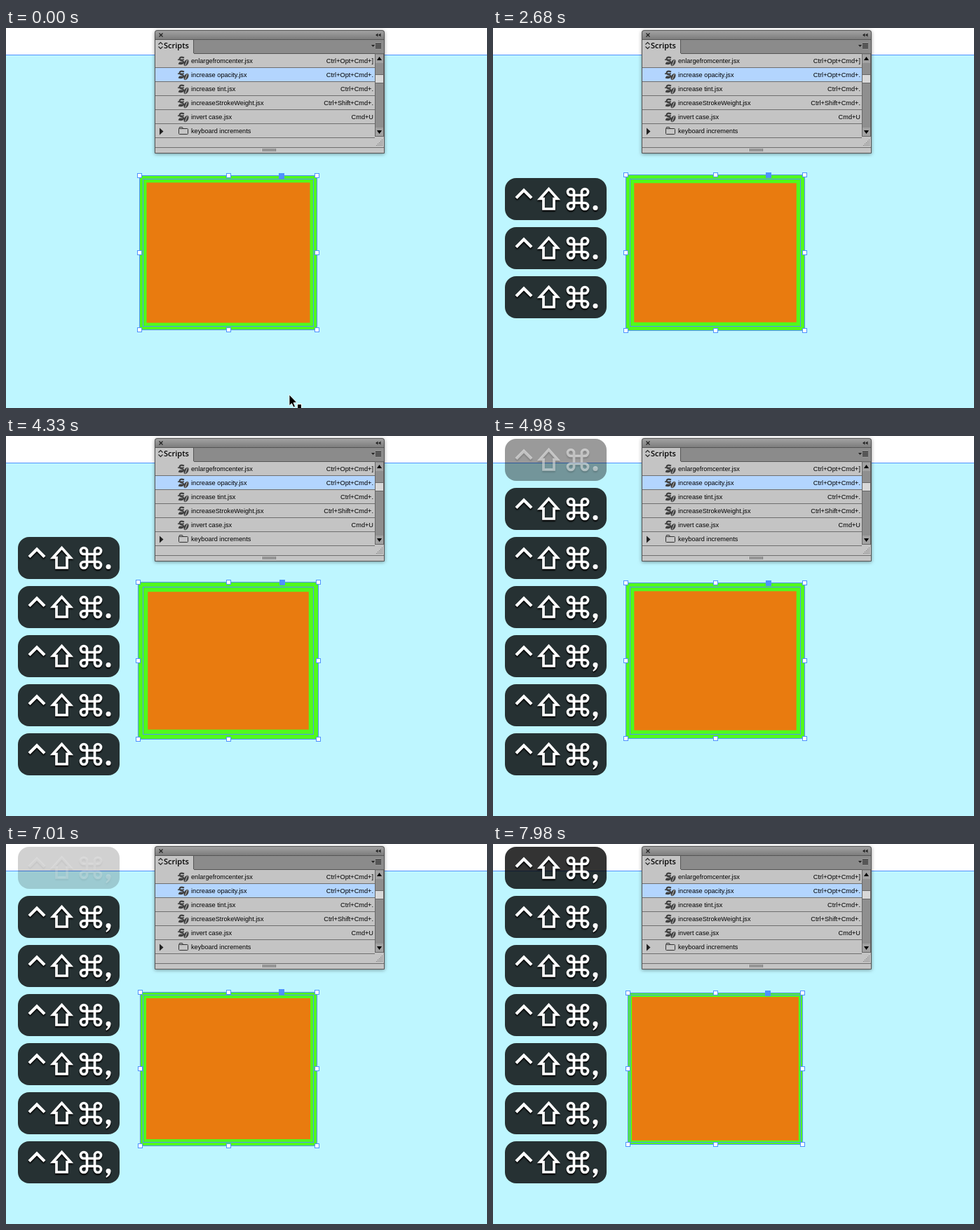
Animation of 686 by 542 pixels, one loop 8 s. Source, as an HTML page with a canvas:

```html
<!DOCTYPE html>
<html lang="en">
<head>
<meta charset="utf-8">
<title>Stroke weight shortcuts</title>
<style>
html, body { margin: 0; width: 100%; height: 100%; overflow: hidden; background: #fff; }
canvas { display: block; }
</style>
</head>
<body>
<canvas id="stage" width="686" height="542"></canvas>
<script>
const ctx = document.getElementById('stage').getContext('2d');
const LOOP = 8000, HOLD = 1910, GONE = 2170, LAG = 70;
const BLUE = '#4f91ff', CYAN = '#bef6ff', GREY = '#c4c4c4', LINE = '#6e6e6e', INK = '#404040';

// Evenly spaced presses; lag is the wait before a new bezel fills the bottom slot
const run = (char, start, gap, count, lag = LAG) =>
  Array.from({ length: count }, (_, i) => ({ char, lag, t: start + gap * i }));
const presses = [
  ...run('.', 2000, 0, 1),
  ...run('.', 2160, 260, 6),
  ...run(',', 4420, 160, 4),
  ...run(',', 5120, 120, 6, 0),
  ...run(',', 7100, 30, 4),
  ...run(',', 7360, 180, 4)
];

// A full stop thickens the stroke, a comma thins it
const weightAt = now => presses.reduce(
  (w, p) => p.t + LAG > now ? w : w + (p.char === '.' ? 0.5 : -0.46), 10);

function fill(color, x, y, w, h) {
  ctx.fillStyle = color;
  ctx.fillRect(x, y, w, h);
}

function trace(points) {
  ctx.beginPath();
  points.forEach(([x, y]) => ctx.lineTo(x, y));
}

function poly(points, color) {
  trace(points);
  ctx.closePath();
  ctx.fillStyle = color;
  ctx.fill();
}

function frame(color, x, y, w, h) {
  ctx.strokeStyle = color;
  ctx.lineWidth = 1;
  ctx.strokeRect(x + 0.5, y + 0.5, w, h);
}

// Small triangle pointing up (s = 1) or down (s = -1)
const wedge = (x, y, r, s) =>
  poly([[x - r, y + s * 2.5], [x, y - s * 2.5], [x + r, y + s * 2.5]], '#000');

function text(str, x, y, font, align = 'left') {
  ctx.font = font;
  ctx.textAlign = align;
  ctx.fillStyle = '#000';
  ctx.fillText(str, x, y);
}

function scriptIcon(x, y) {
  ctx.strokeStyle = INK;
  ctx.lineWidth = 2.2;
  ctx.beginPath();
  ctx.moveTo(x + 9, y + 2);
  ctx.bezierCurveTo(x + 2, y - 1, x + 1, y + 5, x + 5, y + 6);
  ctx.bezierCurveTo(x + 11, y + 7, x + 8, y + 12, x + 1, y + 10);
  ctx.stroke();
  fill(INK, x, y + 4, 9, 1.5);
  fill(INK, x + 2, y + 8, 6, 1.5);
  ctx.beginPath();
  ctx.ellipse(x + 12, y + 9, 3, 5, 0.5, 0, 7);
  ctx.fill();
  trace([[x + 13.5, y + 5], [x + 10.5, y + 13]]);
  ctx.strokeStyle = GREY;
  ctx.lineWidth = 1;
  ctx.stroke();
}

function folderIcon(x, y) {
  ctx.beginPath();
  ctx.roundRect(x, y + 2, 13, 8, 1);
  ctx.moveTo(x, y + 3);
  ctx.lineTo(x + 1, y);
  ctx.lineTo(x + 5, y);
  ctx.lineTo(x + 6, y + 2);
  ctx.strokeStyle = '#333';
  ctx.lineWidth = 1;
  ctx.stroke();
}

const rows = [
  ['enlargefromcenter.jsx', 'Ctrl+Opt+Cmd+]'],
  ['increase opacity.jsx', 'Ctrl+Opt+Cmd+.'],
  ['increase tint.jsx', 'Ctrl+Cmd+.'],
  ['increaseStrokeWeight.jsx', 'Ctrl+Shift+Cmd+.'],
  ['invert case.jsx', 'Cmd+U'],
  ['keyboard increments', '']
];

function drawHeader() {
  const bar = ctx.createLinearGradient(0, 4, 0, 16);
  bar.addColorStop(0, '#a2a2a2');
  bar.addColorStop(1, '#7d7d7d');
  ctx.beginPath();
  ctx.roundRect(213, 4, 326, 12, [3, 3, 0, 0]);
  ctx.fillStyle = bar;
  ctx.fill();
  ctx.strokeStyle = '#222';
  ctx.lineWidth = 1.2;
  for (const s of [-2.5, 2.5]) {
    trace([[221 - s, 7.5], [221 + s, 12.5]]);
    ctx.stroke();
  }
  for (const x of [527, 531]) poly([[x, 10], [x + 3.5, 7.5], [x + 3.5, 12.5]], '#222');

  fill('#8b8b8b', 213, 17, 326, 19);
  fill(GREY, 213, 17, 54, 20);
  fill('#555', 267, 17, 1, 19);
  fill('#555', 268, 36, 271, 1);
  ctx.lineWidth = 1.1;
  for (const s of [-1, 1]) {
    trace([[217.5, 25 + s * 1.5], [220.5, 25 + s * 4.5], [223.5, 25 + s * 1.5]]);
    ctx.stroke();
  }
  text('Scripts', 225, 28.8, '600 11px "Open Sans", sans-serif');
  poly([[521, 24], [526, 24], [523.5, 27]], '#222');
  for (let y = 22; y < 30; y += 2) fill('#222', 527, y, 8, 1);
}

function drawScrollbar() {
  fill('#8f8f8f', 527, 37, 11, 117);
  frame('#666', 526, 36, 12, 118);
  fill('#a2a2a2', 527, 38, 11, 12);
  fill('#a2a2a2', 527, 142, 11, 12);
  wedge(532.5, 43.5, 3.5, 1);
  wedge(532.5, 148.5, 3.5, -1);
  fill('#d8d8d8', 527, 67, 11, 11);
  frame('#666', 526, 66, 12, 12);
}

function drawPanel() {
  ctx.save();
  ctx.shadowColor = 'rgba(0,0,0,.4)';
  ctx.shadowBlur = 5;
  ctx.shadowOffsetY = 1;
  ctx.beginPath();
  ctx.roundRect(212, 3, 328, 176, [4, 4, 1, 1]);
  ctx.fillStyle = '#555';
  ctx.fill();
  ctx.restore();

  fill(GREY, 213, 36, 326, 142);
  drawHeader();
  const font = '9.2px "Liberation Sans", Arial, sans-serif';
  rows.forEach(([name, keys], i) => {
    const y = 37 + 20 * i;
    if (i === 1) fill('#b3d5fe', 213, y, 313, 19);
    fill(LINE, 213, y + 19, 313, 1);
    text(name, 264, y + 13, font);
    text(keys, 524, y + 13, font, 'right');
    if (keys) scriptIcon(245, y + 3.5);
  });
  poly([[219, 142.5], [224.5, 147.5], [219, 152.5]], '#222');
  folderIcon(246.5, 141.5);
  drawScrollbar();

  for (let i = 0; i < 5; i++)
    for (let j = 0; j <= i; j++) fill('#777', 536 - 2 * j, 159 + 2 * i, 1, 1);
  fill(LINE, 213, 170, 326, 1);
  for (let x = 366; x < 386; x += 2) fill('#666', x, 172, 1, 4);
}

function drawBox(w) {
  const h = w / 2;
  fill('#e97b0f', 195.5, 215.5, 243, 210);
  ctx.strokeStyle = '#50fa1d';
  ctx.lineWidth = w;
  ctx.strokeRect(195.5, 215.5, 243, 210);
  frame(BLUE, 195, 215, 243, 210);

  const left = Math.ceil(195.5 - h) - 1, right = Math.ceil(438 + h);
  const top = left + 20, bottom = right - 13;
  frame(BLUE, left, top, right - left, bottom - top);
  for (const x of [left, 317, right])
    for (const y of [top, 320, bottom]) {
      if (x === 317 && y === 320) continue;
      fill('#fff', x - 3, y - 3, 7, 7);
      frame(BLUE, x - 3, y - 3, 6, 6);
    }
  fill(BLUE, Math.round(386 + 0.3 * w), Math.round(211.9 - h), 8, 8);
}

function commandGlyph(cx, cy) {
  const s = 5.5, c = 10, r = c - s;
  ctx.beginPath();
  for (const d of [-s, s]) {
    ctx.moveTo(cx + d, cy - c); ctx.lineTo(cx + d, cy + c);
    ctx.moveTo(cx - c, cy + d); ctx.lineTo(cx + c, cy + d);
  }
  [[1, 1], [-1, 1], [-1, -1], [1, -1]].forEach(([sx, sy], i) => {
    const from = (i - 1) * Math.PI / 2;
    const x = cx + sx * c, y = cy + sy * c;
    ctx.moveTo(x + r * Math.cos(from), y + r * Math.sin(from));
    ctx.arc(x, y, r, from, from + Math.PI * 1.5);
  });
  ctx.stroke();
}

function shiftGlyph(cx, top) {
  const half = [[0, 0], [12.5, 14], [7.5, 14], [7.5, 28.5]];
  const mirror = half.slice(1).reverse().map(([x, y]) => [-x, y]);
  trace([...half, ...mirror].map(([x, y]) => [cx + x, top + y]));
  ctx.closePath();
  ctx.stroke();
}

function drawBezel(y, char, alpha) {
  ctx.save();
  ctx.translate(17, y);
  ctx.globalAlpha = alpha;
  ctx.beginPath();
  ctx.roundRect(0, 0, 145, 60, 16);
  ctx.fillStyle = 'rgba(0,0,0,.8)';
  ctx.fill();

  ctx.shadowColor = `rgba(0,0,0,${0.2 / (1 - 0.8 * alpha)})`;
  ctx.shadowBlur = 2;
  ctx.shadowOffsetY = 2;
  ctx.strokeStyle = ctx.fillStyle = '#fff';
  ctx.lineWidth = 4.2;
  trace([[16, 28.5], [27, 17.5], [38, 28.5]]);
  ctx.stroke();
  ctx.lineWidth = 3.7;
  shiftGlyph(62.5, 15.5);
  commandGlyph(104, 30);

  ctx.beginPath();
  ctx.arc(129, 42.5, 3.5, 0, 7);
  if (char === ',') {
    ctx.moveTo(132.5, 42);
    ctx.quadraticCurveTo(132.5, 49, 126, 52);
    ctx.lineTo(125.5, 50);
    ctx.quadraticCurveTo(128.5, 48, 128.5, 44);
  }
  ctx.fill();
  ctx.restore();
}

// Each press pushes the older bezels up one slot
function drawBezels(now) {
  const past = presses.filter(p => p.t <= now);
  past.forEach((p, i) => {
    const slot = past.length - 1 - i, age = now - p.t;
    if (slot > 6 || age < p.lag || age >= GONE) return;
    drawBezel(424 - 70 * slot, p.char, Math.min(1, (GONE - age) / (GONE - HOLD)));
  });
}

function drawCursor() {
  poly([[404, 523], [404, 538.5], [407.5, 535.5], [410, 541], [412.5, 540], [410, 534.5], [414.5, 534]], '#000');
  ctx.strokeStyle = '#fff';
  ctx.lineWidth = 0.8;
  ctx.stroke();
  fill('#fff', 415, 536, 7, 6);
  fill('#000', 416, 537, 5, 5);
}

function draw(now) {
  fill('#fff', 0, 0, 686, 38);
  fill(CYAN, 0, 39, 686, 503);
  fill(BLUE, 0, 38, 686, 1);
  drawPanel();
  drawBox(weightAt(now));
  drawBezels(now);
  if (now < 90) drawCursor();
}

const start = performance.now();
function tick() {
  draw((performance.now() - start) % LOOP);
  requestAnimationFrame(tick);
}
tick();
</script>
</body>
</html>
```
